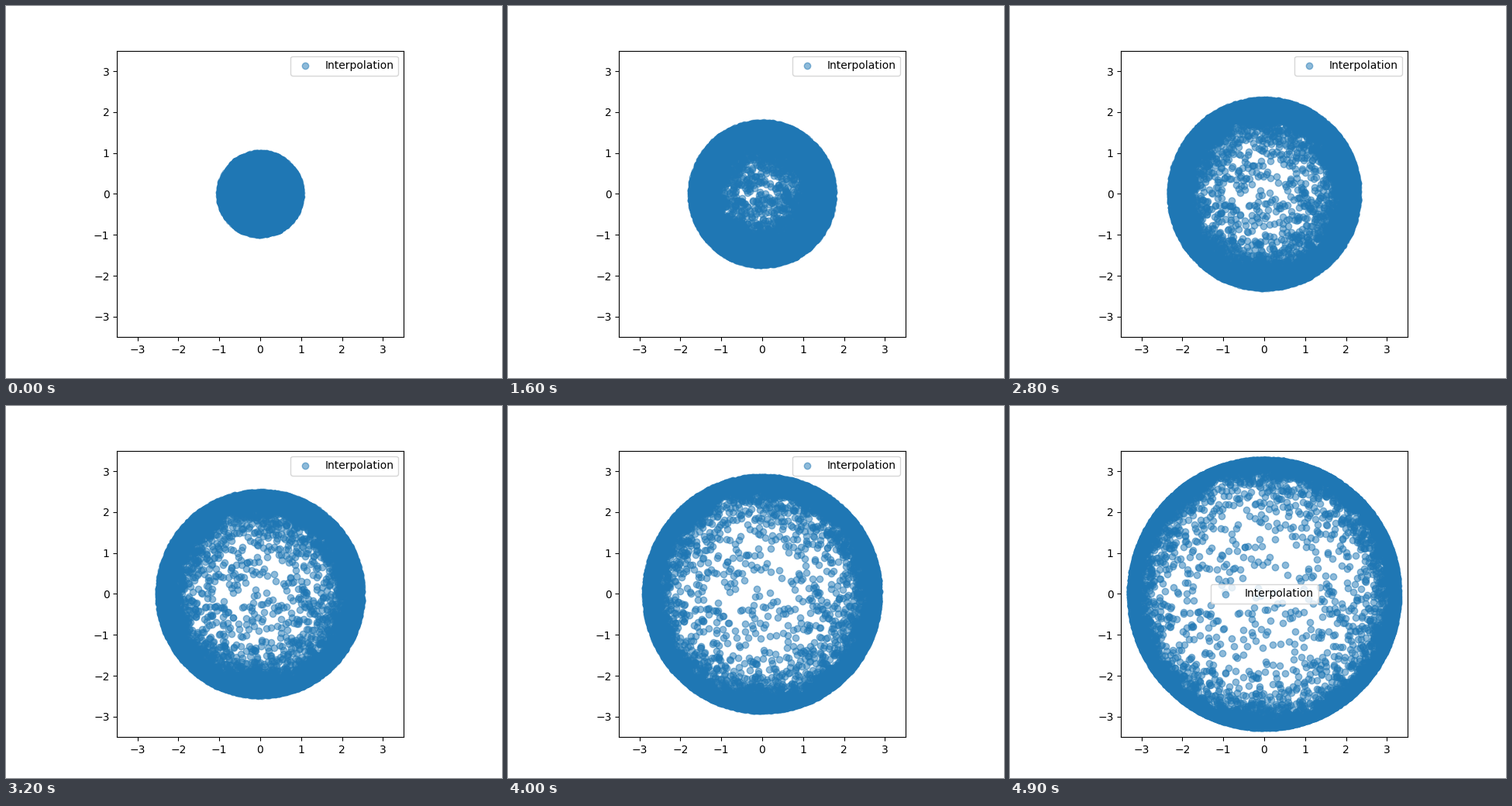
These frames come from a looping animation (640x480 px, 5000 ms). A matplotlib script:

```python
import numpy as np
import matplotlib.pyplot as plt
from matplotlib.animation import FuncAnimation

FRAMES = 50
INTERVAL = 100
COUNT = 10000
END_RADIUS = 3.276
SOFTNESS = 0.2
LEGEND_MOVE = 44

# Start: points spread evenly over the unit disk.
rng = np.random.default_rng(4)
radius = np.sqrt(rng.random(COUNT))
angle = rng.uniform(0, 2 * np.pi, COUNT)
direction = np.column_stack([np.cos(angle), np.sin(angle)])


def push_outward(r):
    """Map the unit disk onto a large disk crowded at its rim."""
    return END_RADIUS * r * np.sqrt((1 + SOFTNESS**2) / (r**2 + SOFTNESS**2))


start = direction * radius[:, None]
end = direction * push_outward(radius)[:, None]

fig, ax = plt.subplots(figsize=(6.4, 4.8), dpi=100)
ax.set_xlim(-3.5, 3.5)
ax.set_ylim(-3.5, 3.5)
ax.set_aspect("equal")
ax.set_xticks(range(-3, 4))
ax.set_yticks(range(-3, 4))
points = ax.scatter(start[:, 0], start[:, 1], alpha=0.5, label="Interpolation")
legend = ax.legend(loc="upper right")


def update(frame):
    t = frame / (FRAMES - 1)
    points.set_offsets((1 - t) * start + t * end)
    # The legend jumps to the middle once the rim reaches its corner.
    legend.set_loc("center" if frame >= LEGEND_MOVE else "upper right")
    return points, legend


anim = FuncAnimation(fig, update, frames=FRAMES, interval=INTERVAL,
                     repeat=True, repeat_delay=0, blit=False)
plt.show()
```
